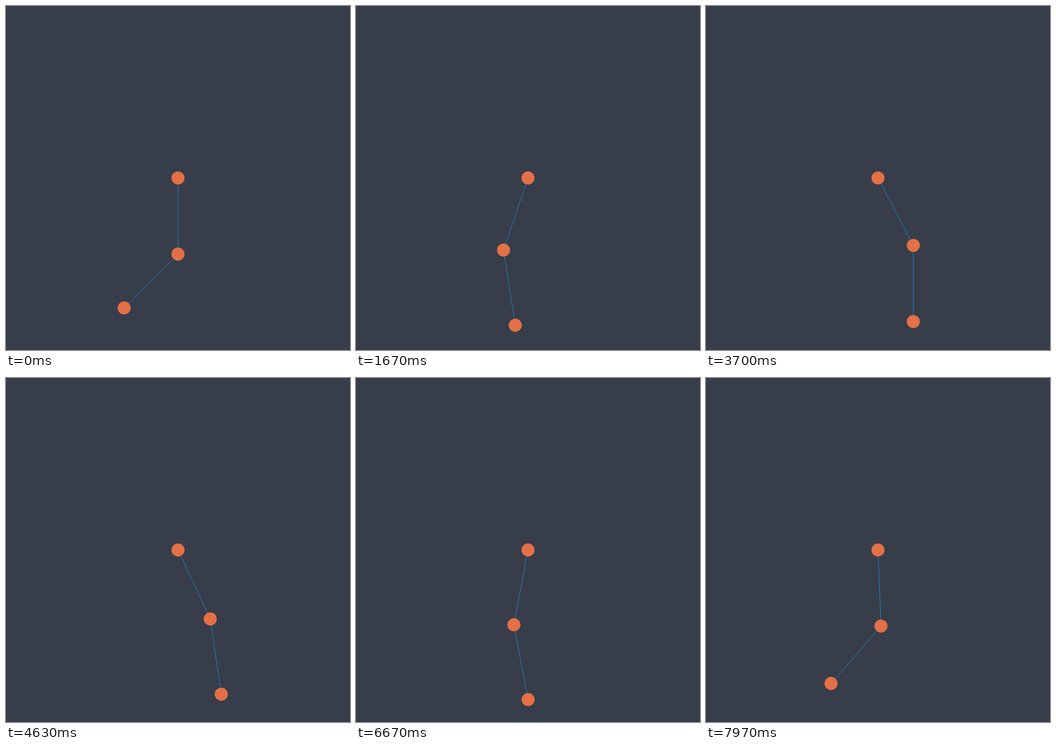
Recreate the animation shown at these times as an HTML page. Size 748 by 748 pixels, loop 8 s.

```html
<!DOCTYPE html>
<html lang="en">
<head>
<meta charset="utf-8">
<title>Double pendulum</title>
<style>
  html, body { margin: 0; width: 100%; height: 100%; overflow: hidden; background: #383d4a; }
  svg { display: block; width: 100vw; height: 100vh; }
  polyline { fill: none; stroke: #0f94e6; stroke-width: 1; }
  circle { fill: #e37046; }
</style>
</head>
<body>
<svg viewBox="0 0 748 748">
  <polyline id="rods"/>
  <circle cx="374" cy="374" r="14.2"/>
  <circle id="elbow" r="14.2"/>
  <circle id="bob" r="14.2"/>
</svg>
<script>
const PIVOT = 374, ROD = 165.5;
const G = 9.81, DT = 0.01;
const FRAMES = 240, LOOP = 8000;
const { sin, cos, PI } = Math;

// State: [angle1, angle2, speed1, speed2]; equal masses, unit rods.
function rates([a, b, va, vb]) {
  const s = sin(a - b), c = cos(a - b);
  const pull = s * va * va - G * sin(b);
  const acc = (-2 * G * sin(a) - s * vb * vb - c * pull) / (2 - c * c);
  return [va, vb, acc, pull - c * acc];
}

const add = (p, d, h) => p.map((x, i) => x + d[i] * h);

// One Runge-Kutta step.
function step(p, h) {
  const k1 = rates(p);
  const k2 = rates(add(p, k1, h / 2));
  const k3 = rates(add(p, k2, h / 2));
  const k4 = rates(add(p, k3, h));
  return p.map((x, i) => x + h / 6 * (k1[i] + 2 * k2[i] + 2 * k3[i] + k4[i]));
}

const poses = [[0, -PI / 4, 0, 0]];
while (poses.length < FRAMES) poses.push(step(poses[poses.length - 1], DT));

const rods = document.getElementById("rods");
const elbow = document.getElementById("elbow");
const bob = document.getElementById("bob");

function place(dot, [x, y]) {
  dot.setAttribute("cx", x);
  dot.setAttribute("cy", y);
}

const swing = ([x, y], angle) => [x + ROD * sin(angle), y + ROD * cos(angle)];

function draw(ms) {
  // 30 poses a second, with starts rounded to 10 ms
  const n = Math.floor((ms % LOOP + 3.4) * FRAMES / LOOP) % FRAMES;
  const [a, b] = poses[n];
  const top = [PIVOT, PIVOT];
  const mid = swing(top, a);
  const end = swing(mid, b);
  rods.setAttribute("points", [top, mid, end].join(" "));
  place(elbow, mid);
  place(bob, end);
}

const start = performance.now();
function tick() {
  draw(performance.now() - start);
  requestAnimationFrame(tick);
}
tick();
</script>
</body>
</html>
```
